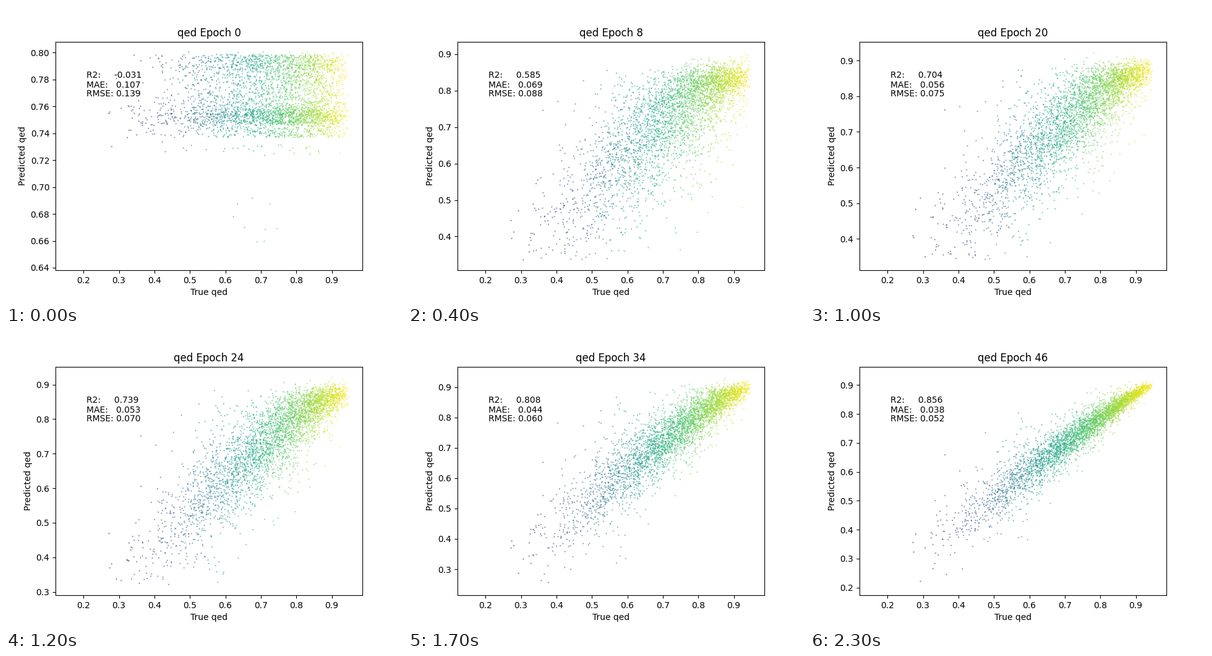
These frames come from a looping animation (640x480 px, 2.4 s). A matplotlib script:

```python
import numpy as np
import matplotlib.pyplot as plt
from matplotlib.animation import FuncAnimation

FRAMES, STEP_MS, N = 24, 100, 3800
X_MIN, X_SPAN = .1605, .7865

# Key steps, the scores read there and the range of predictions
KEYS = [0, 4, 7, 10, 15, 19, 23]
R2 = [-.031, .585, .628, .704, .791, .826, .856]
MAE = [.107, .069, .067, .056, .048, .041, .038]
LOW = [.6458, .3356, .3036, .3402, .2899, .2068, .2088]
HIGH = [.8005, .9061, .8854, .9245, .9179, .9477, .9280]

rng = np.random.default_rng(7)


def lerp(a, b, p):
    return a + (b - a) * p


def first_guess(x):
    """Untrained output: two soft bands on an even spread, a few low strays."""
    r = rng.random(N)
    y = np.select(
        [r < .01, r < .20, r < .25, r < .34],
        [rng.uniform(.7235, .732, N), rng.normal(.754, .003, N),
         rng.normal(.7485, .001, N), rng.normal(.792, .0035, N)],
        rng.uniform(.737, .799, N))
    left = (x < .47) & (rng.random(N) < .6)
    y[left] = rng.normal(.753, .008, left.sum())
    strays = rng.choice(np.flatnonzero((x > .3) & (x < .75)), 9)
    y[strays] = rng.uniform(LOW[0], .692, 9)
    return np.minimum(y, HIGH[0])


x = X_MIN + X_SPAN * rng.beta(4.5, 1.7, N)
y0 = first_guess(x)
error = np.clip(.8 * rng.standard_t(5, N), -4.5, 4.5)
jitter = rng.normal(size=(2, FRAMES, N))


def warp(k):
    """Most of the early learning happens in the first step."""
    return k if k >= KEYS[1] else KEYS[1] * (1 - 4.0 ** -k)


def at(k, values):
    return np.interp(warp(k), KEYS, values)


def cloud(k):
    """Noisy x through a curve that flattens at the top; both sharpen."""
    t = max(k, KEYS[1])
    p = (t - KEYS[1]) / (KEYS[-1] - KEYS[1])
    low, high = at(t, LOW), at(t, HIGH)

    sigma = .11 * (1 - .5 * p) * lerp(1, 2.2 * (1.05 - x), p)
    seen = x + sigma * (.93 * error + .36 * jitter[0, k])
    knee, soft = lerp(.84, .95, p), lerp(.06, .03, p)
    y = high - lerp(.056, .008, p)
    y = y - .9 * soft * np.logaddexp(0, (knee - seen) / soft)
    y = y + lerp(.018, .004, p) * jitter[1, k]

    # Fold values back inside the range
    y = high - np.abs(high - y)
    y = low + np.abs(y - low)
    return lerp(y0, y, min(warp(k) / KEYS[1], 1))


fig, ax = plt.subplots(figsize=(6.4, 4.8), dpi=100)
dots = ax.scatter(x, y0, s=2.5, c=x, cmap="viridis", alpha=.55, linewidths=0)
ax.set_xlim(X_MIN - X_SPAN / 20, X_MIN + X_SPAN * 1.05)
ax.set_xlabel("True qed")
ax.set_ylabel("Predicted qed")
title = ax.set_title("")
labels = [ax.text(.1, y, "", transform=ax.transAxes) for y in (.843, .80, .76)]


def update(k):
    dots.set_offsets(np.column_stack([x, cloud(k)]))
    low, high = at(k, LOW), at(k, HIGH)
    margin = (high - low) / 20
    ax.set_ylim(low - margin, high + margin)

    title.set_text(f"qed Epoch {2 * k}")
    r2 = at(k, R2)
    rmse = .137 * np.sqrt(1 - r2)
    labels[0].set_text(f"R2:     {r2:.3f}")
    labels[1].set_text(f"MAE:   {at(k, MAE):.3f}")
    labels[2].set_text(f"RMSE: {rmse:.3f}")
    return [dots, title, *labels]


anim = FuncAnimation(fig, update, frames=FRAMES, interval=STEP_MS,
                     repeat=True, repeat_delay=0, blit=False)
plt.show()
```
